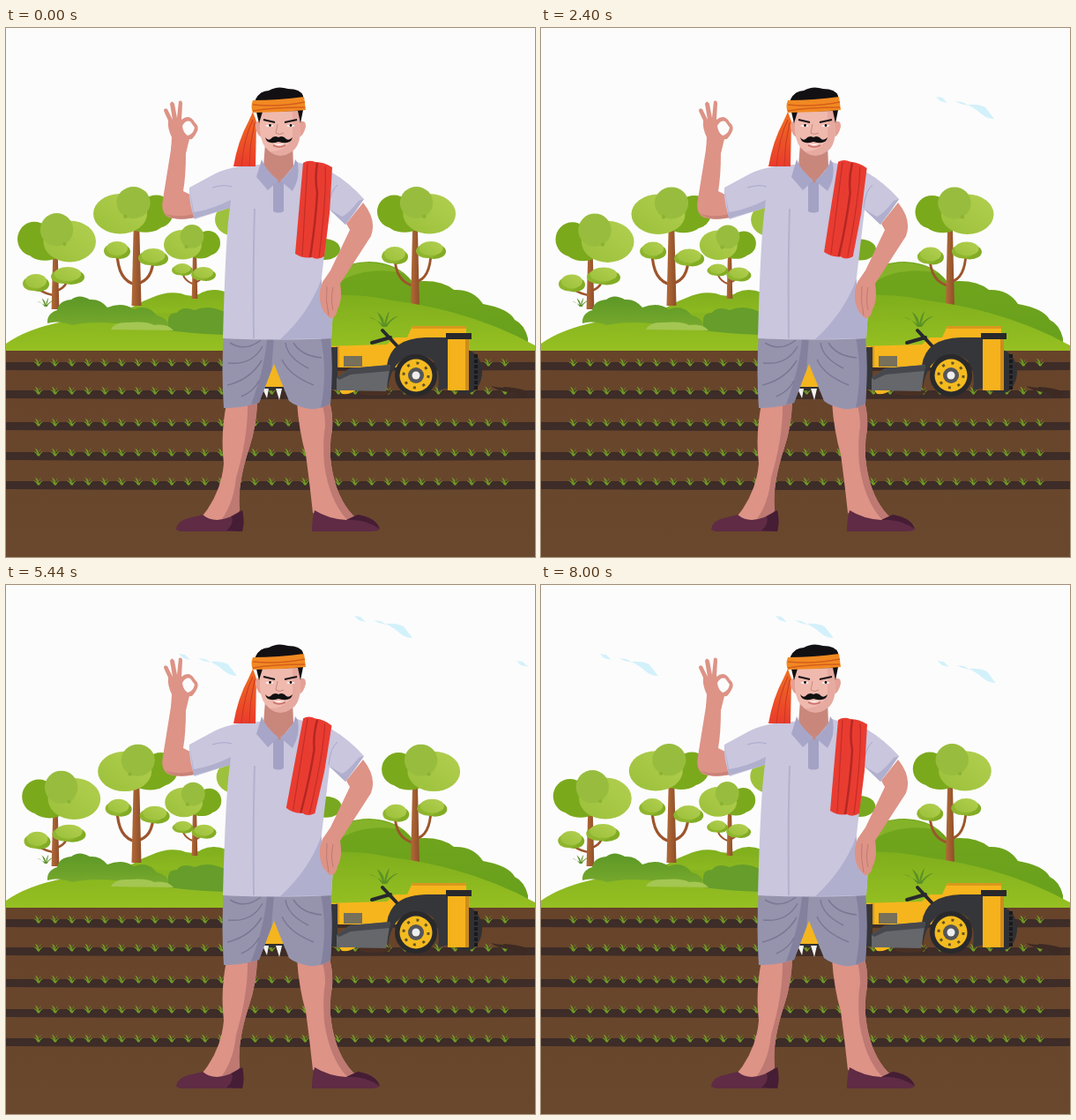
An HTML page that plays this animation: 600 by 600 pixels, repeating every 8.08 s.

```html
<!DOCTYPE html>
<html lang="en">
<head>
<meta charset="utf-8">
<title>Farmer in the field</title>
<style>
  html, body { margin: 0; width: 100%; height: 100%; overflow: hidden; background: #fcfcfc; }
  svg { display: block; width: 100vw; height: 100vh; }
</style>
</head>
<body>
<svg viewBox="0 0 600 600">
  <defs>
    <linearGradient id="hill" x2="0" y2="1"><stop stop-color="#7fae1d"/><stop offset="1" stop-color="#96c022"/></linearGradient>
    <linearGradient id="ridge" x2="0" y2="1"><stop stop-color="#72a51d"/><stop offset="1" stop-color="#67a01c"/></linearGradient>
    <linearGradient id="bush" x2="0" y2="1"><stop stop-color="#5c9726"/><stop offset="1" stop-color="#78aa2d"/></linearGradient>
    <linearGradient id="leaf" x1="0" y1="1" x2="1" y2="0"><stop stop-color="#9bc03a"/><stop offset="1" stop-color="#b2cf50"/></linearGradient>
    <linearGradient id="wood"><stop stop-color="#b26a38"/><stop offset="1" stop-color="#8f4e28"/></linearGradient>
    <linearGradient id="soil" x2="0" y2="1"><stop stop-color="#67432a"/><stop offset="1" stop-color="#69482d"/></linearGradient>
    <linearGradient id="tail" x2="0" y2="1"><stop stop-color="#ef6f22"/><stop offset="1" stop-color="#ea3b2b"/></linearGradient>
    <g id="wisp" fill="#d3f1fa">
      <path d="M-66-25L-59-24L-53-18L-61-20Z"/>
      <path d="M-44-20L-36-19L-29-15L-38-17Z"/>
      <path d="M-30-16Q-18-17-10-13L0 0Q-8 0-14-5L-20-10Z"/>
    </g>
    <path id="sprout" d="M0 4Q-2 0-5-1Q-1-1 0 2Q-2-3-3-5Q1-3 1 1Q2-3 4-5Q2-1 1 2Q4-1 6-1Q3 1 2 4Z" fill="#729d28"/>
    <path id="tuft" d="M-2 9Q-10-2-18-2Q-8 1-2 6Q-7-6-8-8Q0-2 0 6Q2-5 6-9Q4 0 2 6Q10-3 16-3Q7 1 3 9Z" fill="#5b9126"/>
  </defs>

  <g id="clouds">
    <use href="#wisp" y="103"/><use href="#wisp" x="199" y="60"/><use href="#wisp" x="383" y="111"/>
  </g>

  <!-- Back hills -->
  <path fill="url(#ridge)" d="M355 300Q368 266 412 265Q445 266 461 288Q492 284 508 297Q530 296 541 313Q570 318 577 331Q588 336 592 352V366H355Z"/>
  <path fill="#84b329" d="M355 303Q368 267 410 266Q436 267 451 278Q424 272 398 279Q374 286 366 303Z"/>
  <path fill="url(#hill)" d="M125 330Q145 313 165 306Q182 298 198 301Q212 307 222 300Q240 292 262 306V340H125Z"/>

  <g id="trees"></g>

  <!-- Front hill and bushes -->
  <path fill="url(#hill)" d="M0 366V358Q24 341 65 333Q160 318 250 325L360 303Q400 301 438 309Q530 321 600 360V366Z"/>
  <use href="#tuft" transform="translate(45 311) scale(.55)"/>
  <path fill="url(#bush)" d="M47 335Q46 324 58 320Q60 309 74 308Q83 301 95 308Q107 307 115 317Q132 310 145 319Q161 313 171 326Q183 329 185 337Q165 344 140 337Q102 331 75 337Q58 331 47 335Z"/>
  <path fill="#669d2b" d="M184 334Q183 323 194 323Q200 315 214 320Q229 313 248 322V348Q215 347 184 343Z"/>
  <path fill="#a4c652" d="M119 342Q123 333 139 334Q160 332 168 337Q183 335 190 343Z"/>
  <use href="#tuft" x="429" y="330"/>

  <!-- Field -->
  <path fill="url(#soil)" d="M0 366H600V600H0Z"/>
  <g id="rows"></g>

  <!-- Tractor -->
  <g>
    <ellipse cx="418" cy="413" rx="18" ry="4" fill="#493022"/>
    <path fill="#3d2a23" d="M550 406Q560 409 566 407Q580 408 592 412L590 419Q580 420 574 413Q559 413 550 406Z"/>
    <ellipse cx="521" cy="390" rx="19" ry="25" fill="#303033"/>
    <path d="M533 370V411" stroke="#19191b" stroke-width="4" stroke-dasharray="4 2"/>
    <path fill="#f6b51d" d="M360 361L432 359L441 351H455L461 338H522V365H478L445 385H360Z"/>
    <path fill="#d9981d" d="M461 338H522V341H460ZM374 361H378V385H374Z"/>
    <path fill="#77705a" d="M383 372H404V384H383Z"/>
    <path fill="#35363a" d="M366 362H376V410H366ZM432 383Q436 352 476 351H501L502 408L490 411Q495 370 466 371Q437 373 433 410Z"/>
    <path fill="#65676b" d="M375 411V397L390 386L436 382L431 412Z"/>
    <path fill="#46484d" d="M375 397L390 386L436 382L435 389L391 393L378 399Z"/>
    <path fill="#f6b51d" d="M378 411H396Q391 416 381 415Z"/>
    <path d="M415 357L436 351M427 343L443 360" stroke="#28292c" stroke-width="4" stroke-linecap="round"/>
    <circle cx="465" cy="394" r="24" fill="#29292c"/>
    <circle cx="465" cy="394" r="18.5" fill="#f4bb20"/>
    <circle cx="465" cy="394" r="14" fill="none" stroke="#655323" stroke-width="3" stroke-dasharray="3 8"/>
    <circle cx="465" cy="394" r="9" fill="#55565a"/>
    <circle cx="465" cy="394" r="4.5" fill="#eee"/>
    <path fill="#f5b21c" d="M501 350H524V411H501Z"/><path fill="#ce8c1c" d="M521 353H525V411H521Z"/>
    <path fill="#29292c" d="M499 346H528V353H499Z"/>
    <path fill="#f4b51e" d="M304 375H324V410H288Z"/>
    <path d="M287 409H326" stroke="#33302f" stroke-width="4"/>
    <path fill="#f2f2f0" d="M291 409L296 420L298 409ZM306 409L310 422L313 409ZM319 409L323 422L325 409Z"/>
  </g>

  <!-- Legs, shoes, shorts -->
  <path fill="#dd9386" d="M250 426Q243 462 247 494Q244 529 220 557L255 561L265 547Q262 518 276 476Q284 452 285 424ZM330 424Q332 456 340 484Q344 513 348 550L385 561L397 556Q375 536 369 496Q366 474 370 455Q371 438 367 424Z"/>
  <path fill="#bd7972" d="M274 425H285Q284 452 276 476Q262 518 265 547L257 558L244 558Q258 540 261 510Q275 463 274 425ZM358 425H367Q371 438 370 455Q366 474 369 496Q375 536 397 556L389 560Q367 538 361 495Q359 468 362 452Q362 437 358 425Z"/>
  <path fill="#5f2b45" d="M193 569Q194 558 211 555L223 552Q235 562 253 555L268 547Q271 560 268 571H198ZM347 571Q347 557 350 547Q366 557 386 558L399 552Q419 555 424 568Q423 571 413 571Z"/>
  <path fill="#451d34" d="M250 570Q259 563 256 554L268 547Q271 560 268 571ZM386 558L399 552Q419 555 424 568Q405 556 386 558Z"/>
  <path fill="#9694ad" d="M247 346H368Q371 385 368 426Q356 433 344 432Q328 429 321 423L304 381L287 425Q270 431 247 431Q244 388 247 346Z"/>
  <path fill="#83819d" d="M304 351L301 388L287 425L278 427Q294 384 296 351ZM357 351H368Q371 385 368 426L357 431Q365 390 357 351Z"/>
  <path d="M254 357Q271 368 289 354M252 380Q279 383 291 361M251 405Q277 399 290 377M267 418Q281 412 287 400M317 357Q319 374 343 386M326 357Q335 372 358 374M313 376Q321 394 349 405" fill="none" stroke="#7a7894" stroke-width="1.5"/>

  <!-- Raised arm -->
  <path fill="#dd9386" d="M188 132L206 132L204 141Q204 168 201 185L211 190L214 215Q194 219 183 214Q175 208 178 194Z"/>
  <path fill="#c98379" d="M180 210Q194 216 213 211L214 215Q190 220 180 210Z"/>
  <path fill="#dd9386" d="M187 141L188 124Q183 114 184 105L179 94Q179 90 183 92L189 104L186 86Q188 81 191 86L194 102L196 83Q200 81 200 86L199 104Q208 97 214 107Q220 112 216 119Q211 128 208 126L204 142Z"/>
  <path fill="#fcfcfc" d="M200 111Q204 104 209 106L214 113Q212 121 206 122Q201 119 200 111Z"/>

  <!-- Shirt -->
  <path fill="#c9c6de" d="M288 155Q252 156 232 168L208 181Q207 198 214 217L254 204Q249 235 246 352Q300 355 369 352L373 291L357 291L367 206L385 223Q396 210 406 194Q389 175 370 164L330 152L310 174Z"/>
  <path fill="#b1afce" d="M208 181L213 216L254 204L255 195Q233 206 213 209ZM366 205L385 223L406 194L400 196Q388 211 381 214ZM358 284Q344 323 311 353L369 352L371 318Q357 309 358 284Z"/>
  <path d="M282 205Q280 270 281 352" stroke="#b3b1ce" stroke-width="2" fill="none"/>
  <path d="M234 181Q247 177 256 180M376 178Q368 184 366 204" stroke="#aaa8ca" fill="none"/>
  <path fill="#a3a2c4" d="M303 174H315V208Q309 211 303 208Z"/>

  <!-- Arm on the hip -->
  <path fill="#dd9386" d="M386 222L405 198Q421 218 414 236L379 290Q382 309 376 319Q375 329 367 329L360 321Q352 304 359 288L368 275L390 229Z"/>
  <path d="M364 293Q362 309 366 326M371 294Q368 309 371 320" stroke="#c17a72" fill="none"/>

  <!-- Head -->
  <path fill="url(#tail)" d="M280 95L284 106L283 157H258Q263 128 275 106Z"/>
  <path d="M280 104Q270 124 267 157M282 107Q276 133 276 157" stroke="#c93626" fill="none"/>
  <path fill="#c9877c" d="M294 131H325L326 157L310 176L292 157Z"/>
  <path fill="#a7a6c8" d="M290 149Q294 161 309 173L297 184L284 169ZM328 149Q327 161 311 173L325 185Q334 170 331 153Z"/>
  <path fill="#e5a195" d="M289 106Q282 104 283 113Q285 123 291 124ZM333 107Q340 103 340 112Q337 124 331 124Z"/>
  <path fill="#efb9ae" d="M288 92H334V116Q333 135 324 140Q311 149 299 140Q289 133 288 116Z"/>
  <path fill="#e6aaa0" d="M325 94H334V116Q333 135 324 140Q311 149 299 140Q318 140 325 124Z"/>
  <path fill="#121013" d="M283 91V81Q288 71 298 71Q308 65 320 69Q334 69 337 77V93L334 108L331 94L291 95L287 108Z"/>
  <path fill="#f18922" d="M280 82Q309 82 338 78L340 93Q310 96 280 96Q277 89 280 82Z"/>
  <path d="M280 87Q309 90 339 84M280 94Q303 90 339 90" stroke="#d55e1b" stroke-width="1.5" fill="none"/>
  <path d="M292 104L305 107M316 107L330 104" stroke="#181316" stroke-width="2"/>
  <path fill="#fff" d="M294 111Q299 108 304 111Q299 113 294 111ZM318 111Q323 108 328 111Q323 113 318 111Z"/>
  <circle cx="299.5" cy="110.5" r="1.4"/><circle cx="323" cy="110.5" r="1.4"/>
  <path d="M308 109L306 119Q310 122 315 119" stroke="#c98980" fill="none"/>
  <path fill="#fff" d="M303 131Q310 132 316 131Q310 135 303 131Z"/>
  <path d="M303 133Q310 137 317 133" stroke="#c96f69" stroke-width="1.5" fill="none"/>
  <path fill="#111" d="M309 124Q304 121 300 126Q297 128 294 124Q296 133 309 129Q323 133 325 124Q321 128 318 126Q314 121 309 124Z"/>

  <g id="scarf">
    <path fill="#e93c31" d="M337 153Q343 149 351 152Q361 152 370 158L367 210L361 259Q353 264 347 260Q337 262 328 256L333 198Z"/>
    <path d="M353 153Q350 171 353 187Q351 222 345 260" fill="none" stroke="#b52723" stroke-width="2.5"/>
    <path d="M342 153L336 258M362 157Q364 187 355 260" fill="none" stroke="#c32d28" stroke-width="1.2"/>
  </g>
</svg>
<script>
const LOOP = 8080, STEP = 80, SWAY = LOOP / 4;
const find = id => document.getElementById(id);
const ellipse = (x, y, rx, ry, fill) =>
  `<ellipse cx="${x}" cy="${y}" rx="${rx}" ry="${ry}" fill="${fill}"/>`;
const sway = (reach, content) => `<g data-reach="${reach}">${content}</g>`;

// Lobes inside a box of half size w by h: dark on one side, light on the other.
function crown(x, y, w, h, side) {
  const lobe = (dx, dy, rx, ry, fill) => ellipse(x + side * dx * w, y + dy * h, rx * w, ry * h, fill);
  return lobe(.57, .05, .43, .7, "#7ba91c")
    + lobe(.3, .42, .48, .5, "#7ba91c")
    + lobe(-.33, .14, .67, .84, "url(#leaf)")
    + lobe(0, -.33, .42, .67, "#98bd3e")
    + ellipse(x - side * w * .2, y + h * .25, 2.2, 2.2, "#8cb234");
}

function smallCrown([x, y, rx, ry]) {
  return ellipse(x + rx * .2, y + ry * .15, rx * .8, ry * .85, "#82ac24")
    + ellipse(x - rx * .25, y + ry * .1, rx * .75, ry * .8, "#8fb52e")
    + ellipse(x, y - ry * .2, rx * .8, ry * .8, "url(#leaf)");
}

function tree({ x, top, base, width, big, side, small, reach }) {
  const branches = small.map(([sx, sy], i) => {
    const fork = base - 8 - (base - sy) * .25 - i * 3;
    return `M${x} ${fork}Q${sx} ${fork - 4} ${sx} ${sy}`;
  }).join("");
  return `<path d="${branches}" fill="none" stroke="#9c552c" stroke-width="${width * .32}"/>`
    + `<path fill="url(#wood)" d="M${x - width * .32} ${top}H${x + width * .32}L${x + width * .55} ${base}H${x - width * .55}Z"/>`
    + sway(reach[0], crown(...big, side)) + sway(reach[1], small.map(smallCrown).join(""));
}

find("trees").innerHTML = sway(2, ellipse(259, 217, 22, 19, "#9dc13c") + ellipse(361, 251, 18, 12, "#78a820"))
  + [
    { x: 56, top: 250, base: 319, width: 8, big: [57.5, 238, 44.5, 28], side: -1,
      small: [[34, 289, 15, 10], [70, 281, 19, 10]], reach: [6.3, 1.8] },
    { x: 148, top: 222, base: 315, width: 10, big: [144.5, 207, 45.5, 27], side: 1,
      small: [[126, 252, 15, 10], [167, 260, 17, 10]], reach: [6.3, 2] },
    { x: 214, top: 250, base: 307, width: 6, big: [211, 243, 32, 20], side: 1,
      small: [[200, 274, 12, 7], [224, 279, 14, 8]], reach: [1.5, .8] },
    { x: 464, top: 225, base: 315, width: 9, big: [465.5, 207, 44.5, 27], side: -1,
      small: [[441, 258, 15, 10], [482, 252, 17, 10]], reach: [6.2, 1.6] }
  ].map(tree).join("");

find("rows").innerHTML = [379, 411, 447, 481, 514].map(y => {
  let band = `<path fill="#3d2c27" d="M0 ${y}H600V${y + 9}Q300 ${y + 11} 0 ${y + 9}Z"/>`;
  for (let i = 0; i < 29; i++)
    band += `<use href="#sprout" x="${36 + i * 18.9}" y="${y + .5}"/>`;
  return band;
}).join("");

const swaying = [...document.querySelectorAll("[data-reach]")];
const start = performance.now();

function draw(now) {
  const t = Math.floor(Math.max(0, now - start) % LOOP / STEP) * STEP;
  const wind = Math.abs(Math.sin(Math.PI * t / SWAY));
  for (const part of swaying)
    part.setAttribute("transform", `translate(${part.dataset.reach * wind} ${wind * .8})`);

  // The scarf settles after three swings; the clouds stop drifting at seven seconds.
  const swing = t < 3 * SWAY ? 7 * wind : 0;
  find("scarf").setAttribute("transform", `rotate(${swing} 355 153)`);
  find("clouds").setAttribute("transform", `translate(${713 - .0829 * Math.min(t, 7000)} 0)`);
  requestAnimationFrame(draw);
}
draw(start);
</script>
</body>
</html>
```
